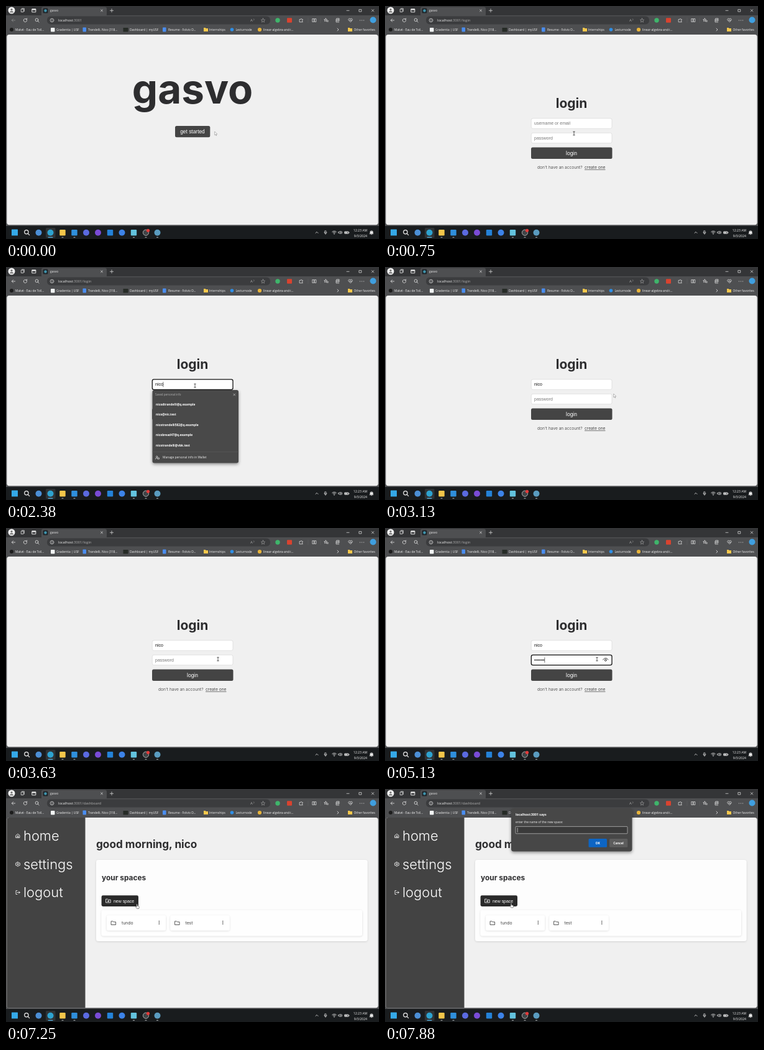
An HTML page for the animation above (8 s loop, 600 px wide and 375 px high).

```html
<!DOCTYPE html>
<html lang="en">
<head>
<meta charset="utf-8">
<title>gasvo</title>
<style>
  html, body { margin: 0; width: 100%; height: 100%; overflow: hidden; background: #191c1e; }
  svg { display: block; width: 100%; height: 100%; }
  text { white-space: pre; }
  .ui { font-family: "Open Sans", "Noto Sans", sans-serif; }
  .form { font-family: "Liberation Sans", Arial, sans-serif; }
  .page { font-family: Inter, Roboto, sans-serif; }
</style>
</head>
<body>
<svg viewBox="0 0 600 375" preserveAspectRatio="none">
  <defs>
    <filter id="soft" x="-20%" y="-30%" width="140%" height="170%">
      <feDropShadow dx="0" dy="0.8" stdDeviation="1.5" flood-opacity="0.15"/>
    </filter>
    <filter id="deep" x="-20%" y="-30%" width="140%" height="170%">
      <feDropShadow dx="0" dy="2" stdDeviation="2.5" flood-opacity="0.42"/>
    </filter>
  </defs>
  <g id="chrome"></g>
  <g id="scene"></g>
</svg>
<script>
const LOOP = 8000, STEP = 125;
const INK = '#2d2d2f', BTN = '#444444', BTN_HOVER = '#2a2a2a', BAR = '#4e4f51';
const USER = 'nico';

// Moments of the story, in ms
const T = {
  login: 375, focusUser: 875, suggest: 1000, blurUser: 2875, focusPass: 3750,
  dashboard: 5750, spaces: 6125, prompt: 7625
};
const LETTERS = [1625, 1875, 2125, 2250];
const DOTS = [4250, 4375, 4625, 4750, 4875, 5000, 5125, 5250];

const EMAILS = [
  'nicodtrandelli@q.example', 'ndtrandelli@arts.velm.test', 'demo@qua.test',
  'nikos4471@q.example', 'remy@rem.test', 'imranvoskel@q.example',
  'nico@nic.test', 'nicotrandelli582@q.example', 'nicobread47@q.example',
  'nicotrandelli@vbk.test'
];

// Pointer path: time, x, y
const PATH = [
  [0, 336, 202], [125, 321, 204], [250, 304, 205], [750, 304, 205],
  [1000, 304, 191], [2500, 304, 191], [2875, 395, 197], [3375, 341, 211],
  [6500, 341, 211], [7375, 203, 184]
];

// ---- drawing helpers ----
const rect = (x, y, w, h, fill, r = 0, more = '') =>
  `<rect x="${x}" y="${y}" width="${w}" height="${h}" rx="${r}" fill="${fill}" ${more}/>`;
const dot = (x, y, r, fill, more = '') =>
  `<circle cx="${x}" cy="${y}" r="${r}" fill="${fill}" ${more}/>`;
const line = (d, color, w = 0.8, more = '') =>
  `<path d="${d}" fill="none" stroke="${color}" stroke-width="${w}" stroke-linecap="round" stroke-linejoin="round" ${more}/>`;
const text = (kind, s, x, y, size, fill, more = '') =>
  `<text class="${kind}" x="${x}" y="${y}" font-size="${size}" fill="${fill}" ${more}>${s}</text>`;
const MID = ' text-anchor="middle"', END = ' text-anchor="end"', BOLD = ' font-weight="700"';

const ICONS = {
  back: 'M20 12H4M11 5l-7 7 7 7',
  reload: 'M20 12a8 8 0 1 1-3-6.200M20 3v5h-5',
  search: 'M16 16l6 6M18 10a7.500 7.500 0 1 1-15 0a7.500 7.500 0 0 1 15 0',
  info: 'M22 12a10 10 0 1 1-20 0a10 10 0 0 1 20 0M12 11v6M12 7v.5',
  star: 'M12 2l3 7 7 .6-5.500 4.800 1.800 7.600-6.300-4-6.300 4 1.800-7.600L2 9.600 9 9z',
  puzzle: 'M4 7h5a3 3 0 1 1 6 0h4v5a3 3 0 1 0 0 6v3H4z',
  split: 'M3 4h7v16H3zM14 4h7v16h-7z',
  boxes: 'M6 3h12v12H6zM3 8v13h14M12 6v6M9 9h6',
  list: 'M10 3l2 5 5 .5-4 3.500 1 5-4-3-5 3 1.500-5L2 8.500 8 8zM17 14h5M15 18h7',
  heart: 'M12 20L3 11a5 5 0 0 1 9-5a5 5 0 0 1 9 5zM7 12h3l2-3 2 5 1-2h3',
  cube: 'M5 5h10v14H5zM8 2h11v14',
  tabs: 'M3 4h18v16H3zM3 8.500h18M4 6h16',
  close: 'M5 5l14 14M19 5L5 19',
  plus: 'M12 3v18M3 12h18',
  min: 'M4 12h16',
  max: 'M5 5h14v14H5z',
  right: 'M8 4l8 8-8 8',
  up: 'M4 16l8-8 8 8',
  mic: 'M9 3h6v11H9zM5 11a7 7 0 0 0 14 0M12 18v4',
  wifi: 'M2 9a14 14 0 0 1 20 0M6 13a8.500 8.500 0 0 1 12 0M10 17a3 3 0 0 1 4 0M12 20v.5',
  sound: 'M3 9h4l6-5v16l-6-5H3zM17 8a6 6 0 0 1 0 8M20 5a10 10 0 0 1 0 14',
  battery: 'M2 8h17v9H2zM22 11v3M5 11h8v3H5z',
  bell: 'M5 17V10a7 7 0 0 1 14 0v7l2 2H3zM10 22h4',
  home: 'M3 10l9-7 9 7v11H3zM9 21v-8h6v8',
  gear: 'M15 12a3 3 0 1 1-6 0a3 3 0 0 1 6 0M10 2h4l1 3 3 1.500 3-1 2 4-2.500 2.500 2.500 2.500-2 4-3-1-3 1.500-1 3h-4l-1-3-3-1.500-3 1-2-4L3.500 12 1 9.500l2-4 3 1L9 5z',
  exit: 'M9 3H3v18h6M9 12h13M17 7l5 5-5 5',
  folder: 'M2 4h7l3 3h10v13H2z',
  folderPlus: 'M2 4h7l3 3h10v13H2zM12 10v7M8.500 13.500h7',
  eye: 'M1 12c5-9 17-9 22 0M16 14a4 4 0 1 1-8 0a4 4 0 0 1 8 0',
  person: 'M13 8a4 4 0 1 1-8 0a4 4 0 0 1 8 0M2 21v-3q0-3 4-3h5M14 14h8v7h-8z'
};
const icon = (name, x, y, size, color, w = 0.8, more = '') =>
  `<g transform="translate(${x - size / 2} ${y - size / 2}) scale(${size / 24})" ${more}>` +
  line(ICONS[name], color, w * 24 / size) + '</g>';
const folder = (x, y) => `<path d="M${x - 3.5} ${y - 3}h2.700l1 1h3.300v5h-7z" fill="#f5c84c"/>`;

// ---- browser window and taskbar ----
function drawChrome() {
  const pale = '#e8e8e8', dim = '#a9a9a9';
  let s = rect(0, 0, 600, 354, BAR) + rect(0, 0, 600, 15, '#343537') +
    rect(57, 1.5, 105, 15, BAR, 3) + dot(9, 7, 5.5, '#f4f4f4') +
    dot(9, 5.7, 1.6, '#777') + '<path d="M6 10.500a3 2.600 0 0 1 6 0z" fill="#777"/>' +
    icon('cube', 27, 7.3, 8, pale) + icon('tabs', 45, 7.3, 7.5, pale, 1) +
    rect(59.5, 3.5, 8, 8, '#20262b', 1.5) + dot(63.5, 7.5, 2.2, '#3f95ae') +
    text('ui', 'gasvo', 71, 9.2, 4.9, '#eee') +
    icon('close', 154, 7.3, 5, pale, 0.7) + icon('plus', 170, 7.3, 7, pale, 0.7) +
    icon('min', 550, 7.3, 6, pale, 0.7) + icon('max', 570, 7.3, 6, pale, 0.7) +
    icon('close', 590, 7.3, 6, pale, 0.7);

  s += icon('reload', 31, 23, 8, pale) + icon('search', 50, 23, 7.5, pale) +
    rect(66, 16.5, 359, 13, '#3b3c3e', 6) + icon('info', 74, 23, 7, pale, 0.7) +
    text('ui', 'A', 393, 25.3, 6, dim) + line('M398.500 20.500q1.500 1 0 2.500', dim, 0.5) +
    icon('star', 413.5, 23, 7.5, dim, 0.6) +
    dot(437, 23, 3.7, '#3fb56b') + rect(452, 19.2, 8, 7.6, '#d9432f', 1) +
    icon('puzzle', 475, 23, 7.5, pale, 0.7) + line('M486 19v8M506 19v8', '#6a6a6a', 0.4) +
    icon('split', 496, 23, 7.5, pale, 0.7) + icon('list', 515, 23, 8, pale, 0.7) +
    icon('boxes', 534, 23, 8, pale, 0.7) + icon('heart', 554, 23, 8, pale, 0.7) +
    [569.5, 572.5, 575.5].map(x => dot(x, 23, 0.6, pale)).join('') + dot(590.5, 22.5, 5, '#3f9fe0');

  const marks = [
    [15, 'Malvé - Eau de Toil...'], [81, 'Gradentia | USF'], [132, 'Trandelli, Nico (318...'],
    [199, 'Dashboard | myUSF'], [261, 'Resume - Folvio D...'], [327, 'Internships'],
    [369.5, 'Lecturnode'], [414, 'linear-algebra-and-i...'], [559.5, 'Other favorites']
  ];
  s += marks.map(([x, name]) => text('ui', name, x, 40, 4.9, '#f2f2f2')).join('') +
    dot(9, 38, 3, '#1d1d1d') + rect(72, 35, 6.5, 6.5, '#f2f5f5', 1) +
    rect(123.5, 34.5, 5.5, 7, '#4a8df0', 0.8) + rect(188.5, 35, 8, 6.5, '#262b26') +
    rect(252, 34.5, 5.5, 7, '#4a8df0', 0.8) + folder(321.5, 38) +
    dot(363.5, 38, 2.8, '#2f8fe6') + dot(408, 38, 3.1, '#e8b43a') +
    icon('right', 534, 38, 6, pale, 0.8) + folder(553.5, 38);

  s += rect(0, 354, 600, 21, '#191c1e') + rect(9, 359.5, 10, 10, '#35a9e8', 0.6) +
    rect(64, 357, 15.5, 16, '#2f3336', 1.5) + icon('search', 33.5, 364.5, 10, '#f2f2f2', 1.2);
  const apps = [
    [52.5, '#4c8fd6', 0], [71.5, '#2ea3d0', 0], [91, '#f3c64a', 1], [110, '#2f8fdc', 1],
    [129, '#5b6ae0', 0], [148, '#7a4bd6', 0], [167.5, '#2482d8', 1], [186.5, '#3d83e8', 0],
    [205.5, '#63c3de', 1], [225, '#404447', 0], [243.5, '#5a9cc0', 0]
  ];
  s += apps.map(([x, c, square]) => square ? rect(x - 4.7, 360, 9.4, 9.4, c, 1.2) : dot(x, 364.7, 5, c)).join('') +
    dot(225, 364.7, 4.6, 'none', 'stroke="#d0d0d0" stroke-width="0.7"') + dot(228.5, 361.3, 2.6, '#e23a3a') +
    rect(67.5, 371.8, 8, 1.3, '#5fb9e8', 0.6) +
    [91, 110, 205.5, 225, 243.5].map(x => rect(x - 1.5, 371.8, 3, 1.1, '#989b9d', 0.5)).join('');
  s += icon('up', 500, 364.5, 6, pale) + icon('mic', 514, 364.5, 7, pale, 0.7) +
    icon('wifi', 528, 364.5, 8, pale) + icon('sound', 537.5, 364.5, 7, pale, 0.7) +
    icon('battery', 548.5, 364.5, 8, pale, 1) + icon('bell', 588, 364.5, 7.5, pale, 0.7) +
    rect(585.8, 362.5, 4.4, 4, pale, 1) +
    text('ui', '12:23 AM', 581, 363.2, 5.1, '#f5f5f5', END) +
    text('ui', '9/3/2024', 581, 372, 5.1, '#f5f5f5', END);
  return s + rect(1.3, 46, 597.4, 306.2, '#f0f0f0', 4);
}

// ---- pages ----
const countPast = (times, t) => times.filter(x => x <= t).length;
const caretOn = (t, times) => {
  const last = Math.max(...times.filter(x => x <= t));
  return Math.floor((t - last) / 500) % 2 === 0;
};
const caret = (x, y, h, color) => line(`M${x} ${y}v${h}`, color, 0.6);

function pointerAt(t) {
  const i = PATH.findLastIndex(p => p[0] <= t);
  const [t0, x0, y0] = PATH[i], [t1, x1, y1] = PATH[i + 1] || [LOOP, x0, y0];
  const u = (t - t0) / (t1 - t0), e = u * u * (3 - 2 * u);
  return [x0 + (x1 - x0) * e, y0 + (y1 - y0) * e];
}
const inside = ([x, y], l, top, r, b) => x >= l && x <= r && y >= top && y <= b;

function welcome(p) {
  const hover = inside(p, 272, 193, 328, 212);
  return text('page', 'gasvo', 300, 157, 65.5, INK, MID + BOLD) +
    rect(272, 193, 56.3, 18.2, hover ? BTN_HOVER : BTN, 2.5) +
    text('form', 'get started', 300, 205, 8.4, '#fff', MID);
}

function field(y, focused) {
  return rect(235.3, y, 129.7, 16.4, '#fff', 2.6,
    focused ? 'stroke="#111" stroke-width="1.3"' : 'stroke="#d2d2d2" stroke-width="0.6"');
}

function suggestions(typed) {
  const found = EMAILS.filter(m => m.startsWith(typed));
  const rule = Math.min(316, 215 + 16.5 * found.length);
  let s = rect(235.5, 198, 138.5, rule - 180, '#484848', 3, 'filter="url(#deep)"') +
    text('ui', 'Saved personal info', 240, 207.1, 4.5, '#b4b4b4') +
    icon('close', 367.3, 205.5, 5, '#e0e0e0', 0.6);
  s += found.slice(0, 6).map((m, i) => text('ui', m, 241, 222.7 + 16.5 * i, 4.85, '#fff', BOLD)).join('');
  if (found.length > 5) {
    s += rect(367, 210, 6.5, rule - 210, '#3b3b3b') + rect(368.2, 220, 4, 52, '#757575') +
      '<path d="M368.700 215.500l1.600-2 1.600 2zM368.700 311l1.600 2 1.600-2z" fill="#bbb"/>';
  }
  return s + line(`M235.500 ${rule}h138.500`, '#5e5e5e', 0.5) +
    icon('person', 243.5, rule + 9, 7, '#e6e6e6', 0.7) +
    text('ui', 'Manage personal info in Wallet', 252, rule + 10.9, 4.9, '#f0f0f0');
}

function login(t, p) {
  const typed = USER.slice(0, countPast(LETTERS, t)), dots = countPast(DOTS, t);
  const userOn = t >= T.focusUser && t < T.blurUser, passOn = t >= T.focusPass;
  let s = text('page', 'login', 300, 163.5, 21, INK, MID + BOLD) +
    field(180.9, userOn) + field(204.3, passOn) +
    text('form', typed || 'username or email', 240, 191.4, 7, typed ? '#111' : '#777');
  if (userOn && caretOn(t, [T.focusUser, ...LETTERS])) {
    const width = [0, 3.9, 5.4, 8.9, 12.8][typed.length];
    s += caret(240 + width, 185.2, 7.6, '#111');
  }
  if (dots) s += icon('eye', 354.8, 212, 9, '#222', 0.9);
  else s += text('form', 'password', 240, 214.8, 7, '#777');
  for (let i = 0; i < dots; i++) s += dot(241.2 + 2.36 * i, 212.5, 0.9, '#111');
  if (passOn && caretOn(t, [T.focusPass, ...DOTS])) s += caret(240.3 + 2.36 * dots, 208.7, 7.6, '#111');
  s += rect(235, 227.6, 130.5, 18.4, inside(p, 235, 227, 365, 246) ? BTN_HOVER : BTN, 2.5) +
    text('form', 'login', 300, 239.8, 8.5, '#fff', MID) +
    text('page', 'don\'t have an account?', 245, 262.3, 6.6, '#555') +
    text('page', 'create one', 321, 262.3, 6.65, '#444', 'text-decoration="underline"');
  if (t >= T.suggest && userOn) s += suggestions(typed);
  return s;
}

function space(name, x) {
  return rect(x, 203.5, 95, 24, '#fff', 2.5, 'filter="url(#soft)"') +
    icon('folder', x + 11, 215.7, 8.5, '#333', 0.8) +
    text('page', name, x + 24, 218, 6.8, '#444') +
    [212.7, 215, 217.3].map(y => dot(x + 84.3, y, 0.75, '#333')).join('');
}

function dashboard(t, p) {
  const loaded = t >= T.spaces, grow = loaded ? 23.5 : 0;
  const hover = inside(p, 153.5, 171, 213.5, 189);
  const menu = [['home', 'home', 75.3, 83], ['gear', 'settings', 121, 128.7], ['exit', 'logout', 166.5, 174.2]];
  let s = '<path d="M127.500 46H5.300a4 4 0 0 0-4 4v298.200a4 4 0 0 0 4 4h122.200z" fill="#434343"/>' +
    menu.map(([pic, name, y, base]) => icon(pic, 19, y, 8, '#fff', 0.8) +
      text('page', name, 28, base, 21.9, '#fff', 'font-weight="300"')).join('');
  s += text('page', 'good morning, ' + USER, 145, 94.5, 17.2, INK, BOLD) +
    rect(145, 114, 436.5, 107.5 + grow, '#fdfdfd', 4, 'filter="url(#soft)"') +
    text('page', 'your spaces', 154, 146.9, 11.9, INK, BOLD) +
    rect(153.6, 171.3, 59.4, 17.6, hover ? BTN_HOVER : BTN, 2.4) +
    icon('folderPlus', 164.6, 180, 8.6, '#fff', 0.8) +
    text('form', 'new space', 173, 182.5, 6.95, '#fff') +
    rect(153.6, 195, 419.4, 17.7 + grow, '#fefefe', 3, 'filter="url(#soft)"');
  return loaded ? s + space('tundo', 162) + space('test', 264.5) : s;
}

function promptBox(t) {
  return rect(203, 31, 194.5, 69.5, '#474747', 4, 'filter="url(#deep)"') +
    text('ui', 'localhost:3001 says', 210, 43, 5.2, '#fff', BOLD) +
    text('ui', 'enter the name of the new space:', 210, 55, 4.9, '#f0f0f0') +
    rect(210, 60.4, 180, 11.4, '#3a3a3a', 1, 'stroke="#b5b5b5" stroke-width="0.8"') +
    (caretOn(t, [T.prompt]) ? caret(213.2, 62.8, 6.6, '#fff') : '') +
    rect(327.5, 80, 29.5, 13.8, '#0d65c4', 1.5) + rect(361, 80, 29.3, 13.8, '#5d5d5d', 1.5) +
    text('ui', 'OK', 342.2, 88.7, 5, '#fff', MID + BOLD) +
    text('ui', 'Cancel', 375.6, 88.7, 5, '#fff', MID + BOLD);
}

// ---- pointer ----
function pointer(t, p) {
  const onLogin = t >= T.login && t < T.dashboard;
  let kind = 'arrow';
  if (t < T.login && inside(p, 272, 193, 328, 212)) kind = 'hand';
  if (onLogin && (inside(p, 235, 181, 365, 198) || inside(p, 235, 204, 365, 221))) kind = 'beam';
  if (t >= T.dashboard && inside(p, 153.5, 171, 213.5, 189)) kind = 'hand';
  const shapes = {
    arrow: '<path d="M-.3 0v5.800l1.400-1.200 .9 2.100.9-.4-.9-2.100h1.800z" fill="#fff" stroke="#777" stroke-width="0.5"/>',
    beam: line('M-1.300-2.800h2.600M0-2.800v5.600M-1.300 2.800h2.600', '#222', 0.7),
    hand: '<path d="M-.7 0q.7-.8 1.400 0v2.700l2.300.6q.8.4.6 1.400l-.5 2.300h-3.300l-2-2.600q.2-.9 1.500 0z" fill="#fff" stroke="#222" stroke-width="0.5"/>'
  };
  return `<g transform="translate(${p[0]} ${p[1]})">${shapes[kind]}</g>`;
}

function render(t) {
  const p = pointerAt(t);
  const [path, page] = t < T.login ? ['', welcome(p)] :
    t < T.dashboard ? ['/login', login(t, p)] : ['/dashboard', dashboard(t, p)];
  return icon('back', 12, 23, 8, '#e4e4e4', 0.8, path ? '' : 'opacity="0.4"') +
    text('ui', `localhost<tspan fill="#b0b0b0">:3001${path}</tspan>`, 84, 25.2, 5.7, '#f2f2f2') +
    page + (t >= T.prompt ? promptBox(t) : '') + pointer(t, p);
}

document.getElementById('chrome').innerHTML = drawChrome();
const scene = document.getElementById('scene');
const start = performance.now();
let shown = -1;
function tick() {
  const t = Math.max(0, performance.now() - start) % LOOP;
  const step = Math.floor(t / STEP) * STEP;
  if (step !== shown) {
    scene.innerHTML = render(step);
    shown = step;
  }
  requestAnimationFrame(tick);
}
tick();
</script>
</body>
</html>
```
